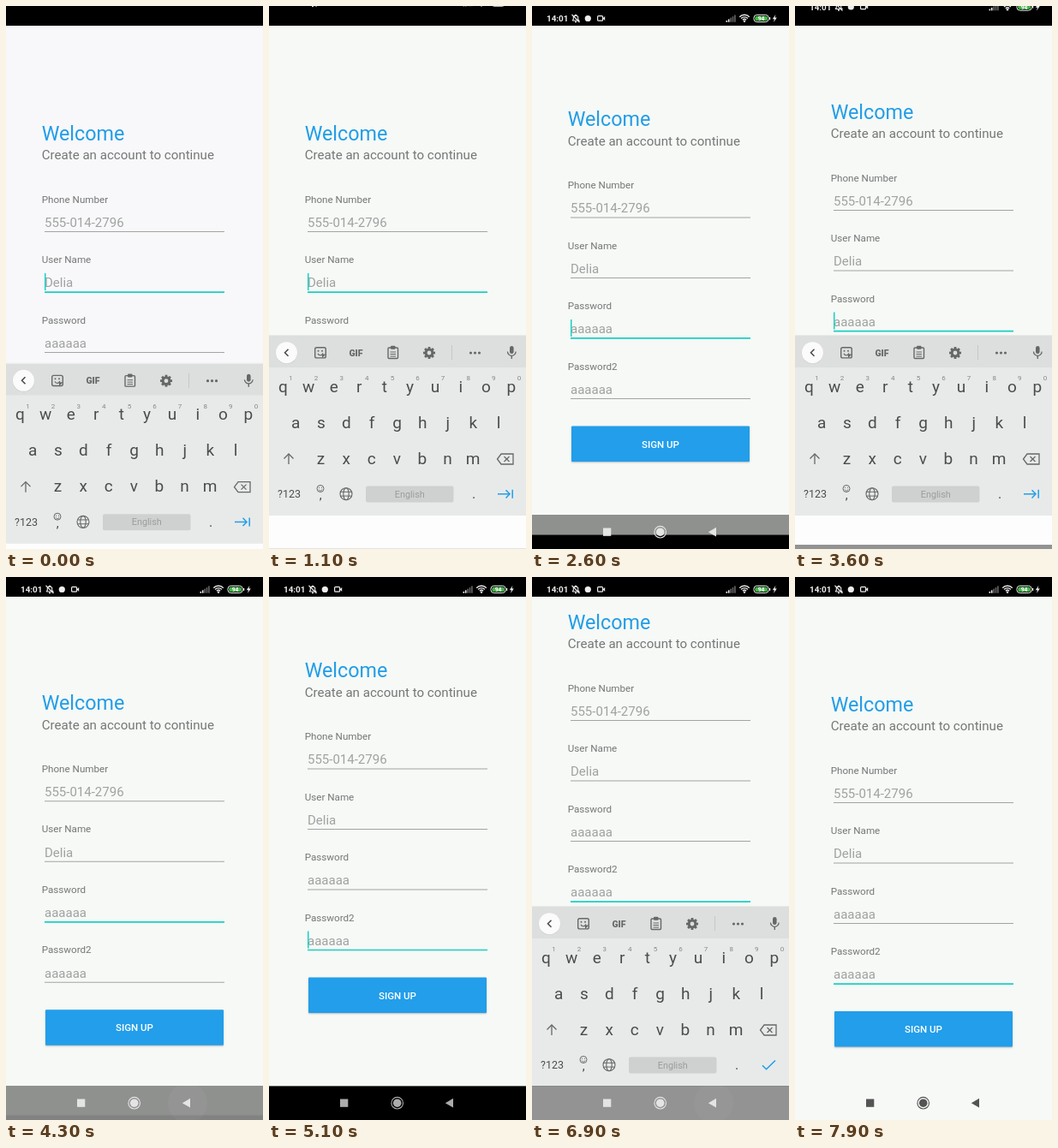
Animation, 300 px wide and 634 px high, one loop 8 s. Source, as an HTML page with a canvas:

```html
<!DOCTYPE html>
<html lang="en">
<head>
<meta charset="utf-8">
<title>Sign up form</title>
<style>
html, body { margin: 0; width: 100%; height: 100%; overflow: hidden; background: #000; }
canvas { display: block; width: 300px; height: 634px; }
</style>
</head>
<body>
<canvas id="stage"></canvas>
<script>
const W = 300, H = 634, LOOP = 8000;
const STATUS_H = 23, NAV_Y = 594, KEYS_Y = 385, KEYS_TRAVEL = 249;
const FONT = 'Roboto, "Noto Sans", sans-serif';
const BLUE = '#229eea', TEAL = '#1bcfc3', INK = '#4b4d4c', ICON = '#666867';

const canvas = document.getElementById('stage');
const g = canvas.getContext('2d');
const dpr = window.devicePixelRatio || 1;
canvas.width = W * dpr;
canvas.height = H * dpr;

// Timing helpers
const span = (t, start, length) => Math.min(1, Math.max(0, (t - start) / length));
const smooth = u => u * u * (3 - 2 * u);
const inOut = u => u < .5 ? 4 * u ** 3 : 1 - 4 * (1 - u) ** 3;
const out = (u, power) => 1 - (1 - u) ** power;
const mix = (a, b, u) => a + (b - a) * u;

// One round per field: focus, pan distance, keyboard and system bar times
const rounds = [
  { from: 0, blink: -200, field: 1, pan: 0, panIn: 0, open: -245, hide: -600, show: 1050, close: 1700, light: 2000 },
  { from: 2500, blink: 2500, field: 2, pan: 25, panIn: 2500, open: 2750, hide: 2830, show: 3490, close: 4100, light: 4340 },
  { from: 4900, blink: 5000, field: 3, pan: 96, panIn: 5045, open: 5200, hide: 5220, show: 6450, close: 7100, light: 7640 }
];

function stateAt(t) {
  const i = t < 2500 ? 0 : t < 4900 ? 1 : 2;
  const r = rounds[i];
  const early = t < r.blink;
  const focus = early ? rounds[i - 1] : r;
  const shown = span(t, r.show, 350);
  const hidden = t < r.show ? span(t, r.hide, 300) : 0;
  const dim = i ? span(t, r.from, i === 1 ? 100 : 330) : 1;
  return {
    field: focus.field,
    caret: Math.floor((t - focus.blink) / 500) % 2 === 0,
    pan: r.pan * (out(span(t, r.panIn, 240), 2) - smooth(span(t, r.close, 240))),
    keys: KEYS_TRAVEL * (t < r.close ? 1 - out(span(t, r.open, 500), 3) : smooth(span(t, r.close, 220))),
    status: t < r.show ? 1 - smooth(hidden) : out(shown, 1.4),
    nav: t < r.show ? 1 - smooth(hidden) : inOut(shown),
    light: t < r.light ? 1 - dim : smooth(span(t, r.light, 260)),
    ripple: span(t, r.close - 250, 120) * (1 - span(t, r.close + 60, 250)),
    done: r.field === 3,
    bg: t < 1100 ? '#f8f8fa' : '#f6f9f6'
  };
}

// Drawing helpers
function text(str, x, y, size, color, align = 'left', weight = 400) {
  g.font = `${weight} ${size}px ${FONT}`;
  g.textAlign = align;
  g.fillStyle = color;
  g.fillText(str, x, y);
}
function box(x, y, w, h, color, radius = 0) {
  g.fillStyle = color;
  g.beginPath();
  g.roundRect(x, y, w, h, radius);
  g.fill();
}
function frame(x, y, w, h, color, radius = 0, width = 1.2) {
  g.strokeStyle = color;
  g.lineWidth = width;
  g.beginPath();
  g.roundRect(x, y, w, h, radius);
  g.stroke();
}
function dot(x, y, r, color) {
  g.fillStyle = color;
  g.beginPath();
  g.arc(x, y, r, 0, 7);
  g.fill();
}
function arc(x, y, r, color, width = 1.2, a = 0, b = Math.PI * 2) {
  g.strokeStyle = color;
  g.lineWidth = width;
  g.beginPath();
  g.arc(x, y, r, a, b);
  g.stroke();
}
function trace(points) {
  g.beginPath();
  points.forEach(([x, y]) => g.lineTo(x, y));
}
function line(color, width, ...points) {
  g.strokeStyle = color;
  g.lineWidth = width;
  trace(points);
  g.stroke();
}
function shape(color, ...points) {
  g.fillStyle = color;
  trace(points);
  g.fill();
}

const fields = [
  ['Phone Number', '555-014-2796'],
  ['User Name', 'Delia'],
  ['Password', 'aaaaaa'],
  ['Password2', 'aaaaaa']
];

function drawForm(s) {
  g.save();
  g.translate(0, -s.pan);
  box(0, 0, W, H, s.bg);
  text('Welcome', 41.7, 156.6, 23.3, '#219de8');
  text('Create an account to continue', 41.7, 179.3, 15.1, '#757776');
  fields.forEach(([label, value], i) => {
    const y = i * 70.5;
    const active = i === s.field;
    text(label, 41.7, y + 229.7, 11.65, '#757776');
    text(value, 45, y + 257.8, 15, '#a0a2a1');
    if (active) {
      box(45, y + 262.7, 210, 1.7, TEAL);
      if (s.caret) box(45, y + 241.5, 1.5, 20, TEAL);
    } else {
      box(45, y + 263, 210, 1, '#a2a4a3');
    }
  });
  g.save();
  g.shadowColor = 'rgba(0,0,0,.25)';
  g.shadowBlur = 2 * dpr;
  g.shadowOffsetY = dpr;
  box(46, 507, 208, 41.5, BLUE, 1);
  g.restore();
  text('SIGN UP', 150, 532.2, 11.5, '#fff', 'center', 500);
  g.restore();
}

function drawToolbar() {
  box(0, 0, W, 37, '#dddfde');
  dot(20.5, 20.3, 12.8, '#cfd1d0');
  dot(20.5, 19.7, 12.5, '#fafbfa');
  line('#454746', 1.5, [22.5, 15.7], [18.5, 19.7], [22.5, 23.7]);

  // Sticker
  frame(53.7, 13.7, 12.6, 12.2, ICON, 2, 1.4);
  dot(57.5, 17.7, 1, ICON);
  dot(62, 17.7, 1, ICON);
  arc(59.8, 19.7, 3, ICON, 1.2, .2, 2.8);
  shape(ICON, [62, 26], [66.5, 21.5], [62, 21.5]);

  text('GIF', 101.5, 23.6, 10.5, ICON, 'center', 900);

  // Clipboard
  frame(139, 14, 11.5, 12.5, ICON, 1, 1.4);
  box(142, 11.8, 5.5, 4, ICON, 1);
  [18.5, 21, 23.5].forEach(y => box(141.5, y, 6.5, 1, ICON));

  // Gear
  for (let k = 0; k < 8; k++) {
    const a = k * Math.PI / 4, c = Math.cos(a), d = Math.sin(a);
    line(ICON, 2.8, [187 + 4 * c, 20 + 4 * d], [187 + 7 * c, 20 + 7 * d]);
  }
  arc(187, 20, 3.9, ICON, 3);

  box(213, 11, 1, 17, '#c6c8c7');
  [235.5, 240.5, 245.5].forEach(x => dot(x, 20, 1.6, ICON));

  // Microphone
  box(281, 12, 4.6, 9, ICON, 2.3);
  arc(283.3, 18.5, 4.8, ICON, 1.3, 0, Math.PI);
  box(282.6, 23, 1.4, 4, ICON);
}

function drawKeys(s) {
  g.save();
  g.translate(0, KEYS_Y + s.keys);
  box(0, 0, W, 260, '#fcfdfc');
  box(0, -1, W, 1, 'rgba(0,0,0,.06)');
  box(0, 37, W, 173, '#e8eae9');
  drawToolbar();

  const row = (letters, x, y) =>
    [...letters].forEach((c, i) => text(c, x + i * 29.6, y, 19, INK, 'center'));
  row('qwertyuiop', 16.5, 65.5);
  row('asdfghjkl', 31.2, 107.5);
  row('zxcvbnm', 60.5, 149.5);
  [...'1234567890'].forEach((c, i) => text(c, 25.5 + i * 29.6, 52, 8, '#858786', 'center'));

  // Shift and backspace
  line(ICON, 1.3, [17.5, 143.5], [23, 138], [28.5, 143.5]);
  line(ICON, 1.3, [23, 138], [23, 150]);
  g.strokeStyle = ICON;
  g.lineWidth = 1.3;
  trace([[266.5, 144], [271, 138], [285, 138], [285, 150], [271, 150]]);
  g.closePath();
  g.stroke();
  line(ICON, 1.3, [274.5, 141], [280.5, 147]);
  line(ICON, 1.3, [280.5, 141], [274.5, 147]);

  // Bottom row
  text('?123', 23.5, 189.3, 12.5, INK, 'center');
  arc(60, 178.5, 4, ICON, 1);
  dot(58.5, 177.5, .6, ICON);
  dot(61.5, 177.5, .6, ICON);
  arc(60, 179, 2, ICON, .8, .2, 2.9);
  text(',', 60.3, 191, 15, INK, 'center');
  arc(90, 184.7, 7, ICON, 1.1);
  g.beginPath();
  g.ellipse(90, 184.7, 3.2, 7, 0, 0, 7);
  g.stroke();
  line(ICON, 1, [83.6, 182.3], [96.4, 182.3]);
  line(ICON, 1, [83.6, 187.1], [96.4, 187.1]);
  box(113, 175.5, 102.5, 19, '#cfd1d0', 2);
  text('English', 164.3, 188.8, 10.8, '#9b9d9c', 'center');
  text('.', 239, 190, 16, INK, 'center');
  if (s.done) {
    line(BLUE, 1.6, [269, 185.3], [273.5, 189.7], [284, 179.5]);
  } else {
    line(BLUE, 1.5, [267, 184.8], [281, 184.8]);
    line(BLUE, 1.5, [276.5, 180.2], [281, 184.8], [276.5, 189.4]);
    line(BLUE, 1.5, [284.2, 179.8], [284.2, 189.8]);
  }
  g.restore();
}

function drawStatus(s) {
  box(0, 0, W, STATUS_H, '#000');
  if (s.status <= 0) return;
  const c = '#eee';
  g.save();
  g.translate(0, -STATUS_H * (1 - s.status));
  text('14:01', 17, 18, 9.9, c, 'left', 700);

  // Muted bell
  line(c, 1.1, [47, 17], [48.3, 15.5], [48.3, 12.5], [51, 10.3], [53.7, 12.5], [53.7, 15.5], [55, 17], [47, 17]);
  line(c, 1.1, [46.5, 10], [55.5, 19]);
  dot(51, 18.6, 1, c);

  dot(65.3, 14.5, 3.6, c);
  frame(76.6, 11.6, 6, 5.6, c, 1, 1.2);
  shape(c, [82.5, 14.4], [85.2, 12], [85.2, 17]);

  // Signal and wifi
  for (let i = 0; i < 5; i++)
    box(226.5 + i * 2.4, 17 - i * 1.6, 1.6, 1.8 + i * 1.6, i < 2 ? c : '#666');
  [3, 5.6, 8.2].forEach(r => arc(248, 18.5, r, c, 1.4, -2.35, -.79));
  dot(248, 17.8, 1.2, c);

  // Battery
  frame(258.8, 10.3, 17.6, 8.4, c, 4, 1);
  box(260.2, 11.7, 14.8, 5.6, '#45b649', 2.6);
  box(277, 13, 1.2, 3, c);
  text('94', 267.6, 17, 6.8, '#fff', 'center', 700);
  shape(c, [284.4, 10], [280.8, 15.2], [283, 15.2], [282, 19], [285.8, 13.6], [283.5, 13.6]);
  g.restore();
}

function drawNav(s) {
  if (s.nav <= 0) return;
  g.save();
  g.translate(0, (H - NAV_Y) * (1 - s.nav));
  g.beginPath();
  g.rect(0, NAV_Y, W, H - NAV_Y);
  g.clip();
  box(0, NAV_Y, W, H - NAV_Y, `rgba(0,0,0,${.42 * (1 - s.light)})`);
  if (s.ripple > 0) dot(212, 614, mix(18, 30, s.ripple), `rgba(255,255,255,${.07 * s.ripple})`);
  const v = Math.round(mix(228, 84, s.light));
  const c = `rgb(${v},${v},${v})`;
  box(83, 609.5, 9.3, 9.3, c);
  arc(149.7, 614.2, 6.8, c, 1.1);
  dot(149.7, 614.2, 4.8, c);
  shape(c, [205.8, 614.2], [215, 608.8], [215, 619.6]);
  g.restore();
}

function draw(t) {
  const s = stateAt(t);
  g.setTransform(dpr, 0, 0, dpr, 0, 0);
  box(0, 0, W, H, '#000');
  drawForm(s);
  if (s.keys < KEYS_TRAVEL) drawKeys(s);
  drawStatus(s);
  drawNav(s);
}

const begin = performance.now();
function tick() {
  draw((performance.now() - begin) % LOOP);
  requestAnimationFrame(tick);
}
tick();
</script>
</body>
</html>
```
